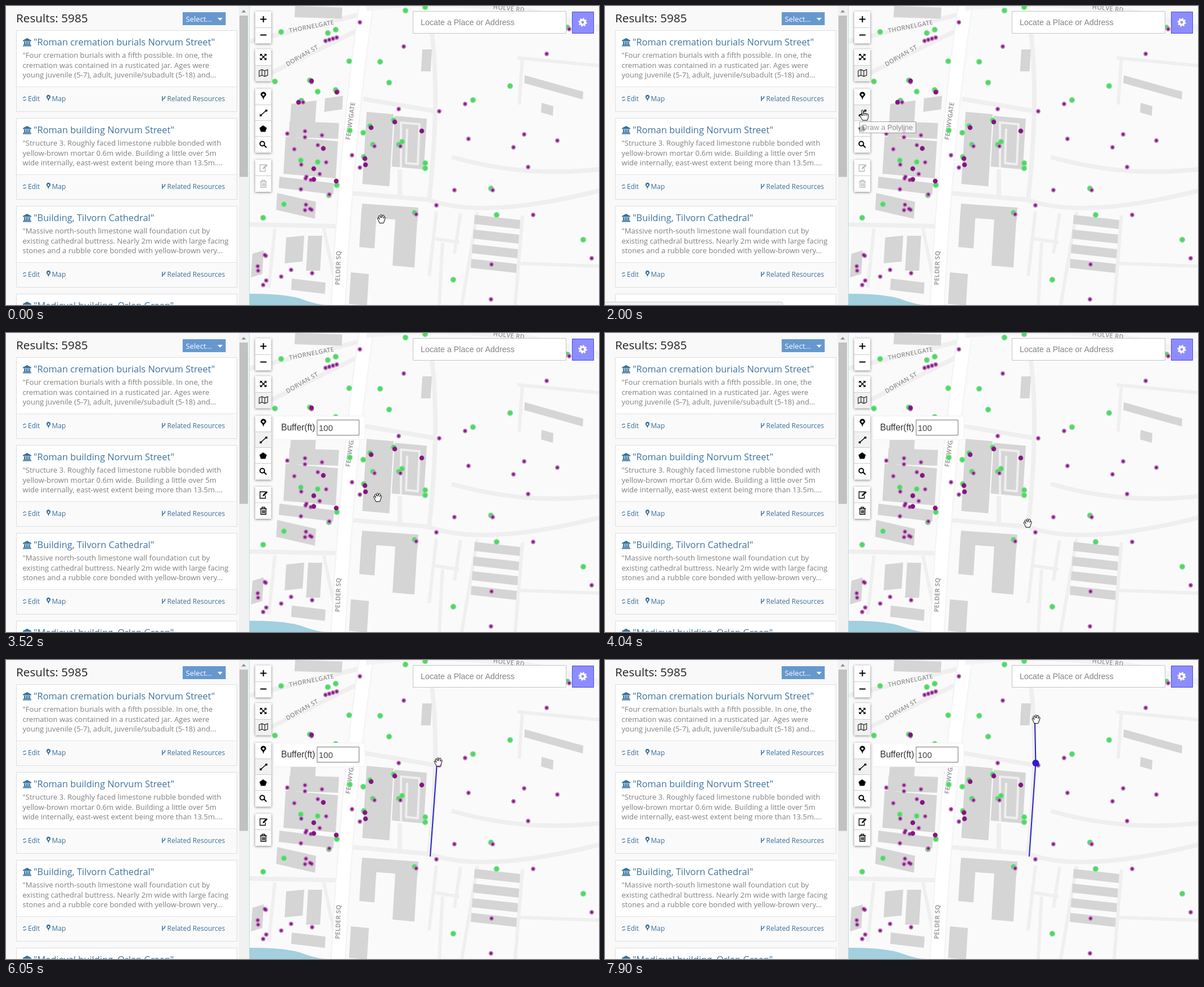
An HTML page that plays this animation: 1054 by 531 pixels, repeating every 8000 ms.

```html
<!DOCTYPE html>
<html lang="en">
<head>
<meta charset="utf-8">
<title>Map search</title>
<style>
html, body { margin: 0; width: 100%; height: 100%; overflow: hidden; background: #f9f9f9; }
svg { display: block; width: 100%; height: 100%; }
text { font-family: "Open Sans", sans-serif; white-space: pre; }
.arial { font-family: "Liberation Sans", Arial, sans-serif; }
.title { font-size: 16.4px; fill: #3d739f; }
.body { font-size: 13.1px; fill: #7f7f7f; }
.link { font-size: 12px; fill: #3a709f; }
.street { font-size: 11px; font-weight: 600; letter-spacing: .35px; fill: #8f8f8f; text-anchor: middle;
  stroke: #fafafa; stroke-width: 2.5px; paint-order: stroke; }
.road { fill: none; stroke-linejoin: round; }
.dots { fill: none; stroke-linecap: round; }
.box { fill: #fff; filter: drop-shadow(0 1px 2px rgba(0,0,0,.5)); }
.cursor { fill: #fff; stroke: #000; stroke-width: 1; stroke-linejoin: round; }
</style>
</head>
<body>
<svg id="stage" viewBox="0 0 1054 531" preserveAspectRatio="none">
  <defs>
    <path id="bank" fill="#35709c" d="M0 4 7.5 0 15 4v1.5H0zM2 6h2v5H2zM5 6h2v5H5zM8 6h2v5H8zM11 6h2v5h-2zM1 11h13v1.5H1zM0 13h15v1.400H0z"/>
    <path id="pin" d="M0 6C-1-1-5-1-5-3.500A5 5 0 0 1 5-3.500C5-1 1-1 0 6zM0-5.500a2 2 0 1 0 .01 0z" fill-rule="evenodd"/>
  </defs>

  <g id="map"></g>
  <path id="line" fill="none" stroke="#2a1fc8" stroke-width="2"/>
  <circle id="vertex" cx="765.5" cy="183" r="6" fill="#2a1fc8"/>

  <g id="controls">
    <path class="box" d="M443 9.500h28.500v57H443zM443 76.500h28.500v57H443zM443 147h28.500v113.500H443zM443 273h28.500v57H443z"/>
    <path d="M443 105h28.500v28.500H443z" fill="#f1f1f1"/>
    <path id="active" d="M443 175h28.500v28.500H443z" fill="#f1f1f1"/>
    <path d="M443 38.500h28.500m-28.500 67h28.500m-28.500 70h28.500m-28.500 28h28.500m-28.500 28h28.500m-28.500 70h28.500" stroke="#ccc"/>
    <path d="M452 23.500h11M457.500 18v11M452 51.500h11" stroke="#000" stroke-width="2"/>
    <path d="M453 86l9 9m0-9l-9 9M453 194l9-8" stroke="#000" stroke-width="1.5"/>
    <path d="M451.500 85h4.500l-4.500 4.500zm11.500 0v4.500l-4.500-4.500zm-11.500 11v-4.500l4.500 4.500zm11.500 0h-4.500l4.500-4.500z"/>
    <path d="M450 115l5-2 5 2 5-2v10l-5 2-5-2-5 2zm5-2v10m5-8v10" fill="none" stroke="#222" stroke-width="1.2"/>
    <use href="#pin" x="457.500" y="161"/>
    <path d="M451 192.500h3.500v3.500H451zm10-8.500h3.500v3.500H461zm-4 28l6.500 4.500-2.500 7h-8l-2.500-7z"/>
    <path d="M459 247.500l4 4M459.500 244.500a4 4 0 1 0-8 0 4 4 0 1 0 8 0" fill="none" stroke="#000" stroke-width="2"/>
    <g id="edit" fill="none" stroke="#000" stroke-width="1.3">
      <path d="M461 283v-1h-9.500v11.500H461v-5"/><path d="M456 290l1-3 6-6 2 2-6 6z" fill="#000" stroke="none"/>
      <path d="M451.500 312h12m-8.500-.5v-2h5v2m-7 1v9.500h9v-9.500m-6.300 2v5.500m2-5.500v5.500m2-5.500v5.500"/>
    </g>
  </g>

  <path d="M723.500 9.500h272v39h-272z" fill="#fff" stroke="#c4c4c4"/>
  <text class="arial" x="737" y="34" font-size="14.3" fill="#858585">Locate a Place or Address</text>
  <path d="M1006.500 10.500h38v38h-38z" fill="#8d8dff" stroke="#4b4bdc"/>
  <g fill="none" stroke="#fff">
    <circle cx="1025" cy="29" r="4.2" stroke-width="3.6"/>
    <circle cx="1025" cy="29" r="6.600" stroke-width="2.200" stroke-dasharray="2.600 2.584"/>
  </g>

  <g id="popover">
    <path d="M476 147.500h162v42H476z" fill="#fff" stroke="#f0f0f0"/>
    <text class="arial" x="489" y="173" font-size="15.6" fill="#333">Buffer(ft)</text>
    <path d="M553 154.500h74.500v27H553z" fill="#fff" stroke="#777"/>
    <text class="arial" x="556" y="174" font-size="15" fill="#444">100</text>
  </g>
  <g id="tip">
    <path d="M452.500 205.500h100v20h-100z" fill="#fff" stroke="#888"/>
    <text class="arial" x="457" y="220" font-size="13" fill="#777">Draw a Polyline</text>
  </g>

  <path d="M0 0h432v531H0z" fill="#f9f9f9"/>
  <path d="M414 0h17.500v531H414z" fill="#f1f1f1"/>
  <path d="M415 17h15v286.500h-15z" fill="#c1c1c1"/>
  <path d="M418.500 11.500h8l-4-4.500z" fill="#8a8a8a"/>
  <path d="M432.500 0v531" stroke="#b9d9e6"/>
  <text x="18" y="28.500" font-size="20.700" fill="#222">Results: 5985</text>
  <path d="M314 11h76.500v23H314z" fill="#6698cf"/>
  <text x="319.500" y="27.500" font-size="13.100" fill="#fff">Select...</text>
  <path d="M376 21h9l-4.500 5z" fill="#fff"/>
  <g id="cards"></g>

  <path id="status" d="M-1 525.500H312q4 0 4 4v3H-1z" fill="#f1f1f1" stroke="#cfcfcf"/>
  <path id="grab" class="cursor" d="M-7-1C-6-3-4-1-3 1L-5-4C-5-6-3-6-2-4L-1-2-2-6C-1-8 1-8 1-6V-2L2-6C3-7.500 5-7 5-5L4-1C5-4 8-4 7-1L5 5 4 7.500H-3L-4 5z"/>
  <path id="point" class="cursor" d="M-3-8c0-2 3-2 3 0v5c1-1 3-1 3 0 1-1 3-1 3 1 1-1 3 0 3 1v5l-2 5h-8l-5-8c0-2 2-2 4 0zM0-3v4M3-3v4M6-2v3"/>
</svg>
<script>
const $ = id => document.getElementById(id);
const range = n => [...Array(n).keys()];
const random = n => { const v = Math.sin(n * 12.9898) * 43758.5453; return v - Math.floor(v); };

const road = (width, d, color = '#efefef') =>
  `<path class="road" d="${d}" stroke-width="${width}" stroke="${color}"/>`;
// Blocks share the tilt of the street grid unless given their own slope.
const block = (x, y, w, h, slope = .09) =>
  `M${x} ${y}l${w} ${w * slope} ${-h * .06} ${h} ${-w} ${-w * slope}z`;
const street = (name, x, y, angle) =>
  `<text class="street" transform="translate(${x} ${y}) rotate(${angle})" y="4">${name}</text>`;
const points = list => list.split(' ').map(p => p.split(',').map(Number));
const dots = (list, outer, outerSize, inner, innerSize) => {
  const d = list.map(([x, y]) => `M${x} ${y}h.01`).join('');
  return `<g class="dots"><path d="${d}" stroke="${outer}" stroke-width="${outerSize}"/>` +
    `<path d="${d}" stroke="${inner}" stroke-width="${innerSize}"/></g>`;
};

const broadRoad = 'M641 -5Q606 230 590 540';
const roads = 'M433 63L625 16M445 132L627 42M635 165L765 187M756 40Q772 160 752 345' +
  'M612 332L750 344Q850 380 1054 328M792 268Q920 305 1054 290M700 290V338M433 388L592 391';
const lanes = 'M765 365L752 480M808 368L797 440M760 413L806 420M776 420L770 531M838 366L810 531' +
  'M918 372L905 531M912 457L1054 462M909 92L1054 106M918 90L912 175M478 395L467 500M565 395L585 492';

const blocks = [
  block(641, 188, 48, 128), block(691, 195, 57, 90),
  block(633, 351, 100, 24, .07), block(632, 360, 27, 68), block(693, 360, 39, 101),
  block(740, 77, 17, 39, 0), block(922, 123, 104, 14, .28), block(952, 172, 21, 17, .28),
  block(507, 174, 45, 45, -.14), block(504, 205, 88, 28, .03), block(497, 232, 93, 66),
  block(486, 303, 97, 20, .12), block(482, 332, 69, 30, .23), block(567, 164, 32, 24, -.14),
  block(438, 440, 20, 42, -.3), block(498, 411, 32, 46, -.1), block(537, 408, 25, 62, 0),
  block(508, 484, 60, 20, .12), block(613, 473, 32, 56), block(514, 0, 84, 20, .03),
  ...range(4).map(i => block(833 - i * 2, 371 + i * 26, 81, 16, .11))
].join('');

// Finds with a second, smaller find beside them
const paired = points('862,324 726,367 698,246 652,246 998,38 525,168 586,149 540,132');
const greens = [...paired, ...points('710,8 745,2 489,46 572,48 586,42 610,98 665,99 478,134 554,152 681,136 ' +
  '896,142 830,167 689,203 647,213 611,221 635,225 704,241 636,268 524,274 554,277 745,279 745,288 588,318 ' +
  '574,336 494,352 457,376 872,371 1026,415 795,486')];
const scatter = (n, seed, x, y, w, h) =>
  range(n).map(i => [x + w * random(seed + i * 2), y + h * random(seed + i * 2 + 1)]);
const sites = [
  ...paired.map(([x, y]) => [x + 3, y + 3]),
  ...range(4).map(i => [568 + i * 6.6, 62 - i * 2]),
  ...scatter(18, 5, 500, 200, 75, 165), ...scatter(9, 70, 434, 440, 150, 80),
  ...points('629,29 707,72 961,85 698,183 770,187 816,174 822,236 902,251 921,228 980,239 928,286 ' +
    '797,327 765,354 937,371 1041,448 863,459 862,521 615,265 629,287')
];
const strong = points('543,133 588,153 520,171 564,253 547,289 547,308 587,311 649,216 691,206 739,222 639,282 638,271');

$('map').innerHTML =
  '<path d="M432 0h622v531H432z" fill="#fafafa"/>' +
  '<path d="M432 511Q500 511 527 521T572 531H432z" fill="#a2d0df"/>' +
  road(8, roads) + road(6, lanes) +
  `<path d="${blocks}" fill="#d5d5d5"/>` +
  road(4, 'M702 287V207L735 210 732 281 711 279 713 218') +
  road(27, broadRoad, '#f3f3f3') + road(23, broadRoad, '#fff') +
  road(12, 'M640 3Q850 -22 1054 40', '#f3f3f3') +
  street('THORNELGATE', 543, 36, -11) + street('DORVAN ST', 526, 88, -30) + street('FENWYGATE', 612, 204, -82) +
  street('PELDER SQ', 590, 465, -88) + street('HOLVE RD', 894, 4, 5) +
  dots(greens, '#8ce49a', 10.5, '#50d765', 7.5) +
  dots(sites, '#c68ac5', 8.4, '#861c84', 4.8) +
  dots(strong, '#a04a9f', 8.8, '#84147f', 7.4);

const cards = [
  ['"Roman cremation burials Norvum Street"',
    '"Four cremation burials with a fifth possible. In one, the',
    'cremation was contained in a rusticated jar. Ages were',
    'young juvenile (5-7), adult, juvenile/subadult (5-18) and...'],
  ['"Roman building Norvum Street"',
    '"Structure 3. Roughly faced limestone rubble bonded with',
    'yellow-brown mortar 0.6m wide. Building a little over 5m',
    'wide internally, east-west extent being more than 13.5m....'],
  ['"Building, Tilvorn Cathedral"',
    '"Massive north-south limestone wall foundation cut by',
    'existing cathedral buttress. Nearly 2m wide with large facing',
    'stones and a rubble core bonded with yellow-brown very...'],
  ['"Medieval building, Orlan Green"']
];
$('cards').innerHTML = cards.map(([title, ...lines], i) => `<g transform="translate(0 ${i * 156})">
  <path d="M18.5 43.5h392v144h-392z" fill="#fff" stroke="#ddd"/>
  <path d="M19 144h391v43H19z" fill="#fafafa"/><path d="M19 143.5h391" stroke="#e4e4e4"/>
  <use href="#bank" x="30" y="57"/>
  <text class="title" x="49" y="70">${title}</text>
  ${lines.map((s, n) => `<text class="body" x="29.5" y="${92 + n * 17.5}">${s}</text>`).join('')}
  <path d="M30.5 164a2.7 2.7 0 0 1 4.7-1.500M35.500 165.500a2.700 2.700 0 0 1-4.700 1.500" fill="none" stroke="#3a709f" stroke-width="1.2"/>
  <text class="link" x="39" y="169">Edit</text>
  <use href="#pin" transform="translate(75.5 165) scale(.72 .85)" fill="#35709c"/>
  <text class="link" x="81.500" y="169">Map</text>
  <path d="M278 160v9m4.500-9v2q0 2-4.500 4" fill="none" stroke="#3a709f" stroke-width="1.5"/>
  <text class="link" x="286.5" y="169">Related Resources</text></g>`).join('');

// Cursor moves: start time, end time, destination
const moves = [
  [760, 1490, 459, 194], [3000, 3070, 462, 192], [3070, 4100, 752, 338], [4300, 4690, 756, 346],
  [4740, 5000, 774, 258], [5000, 5520, 768, 181], [6080, 6640, 768, 77], [6720, 7150, 767, 103], [7310, 7530, 766, 105]
];
function cursorAt(t) {
  let x = 667, y = 378;
  for (const [start, end, toX, toY] of moves) {
    const u = Math.min(1, Math.max(0, (t - start) / (end - start)));
    const eased = u * (2 - u);
    x += (toX - x) * eased;
    y += (toY - y) * eased;
  }
  return [x, y];
}

const show = (id, on) => $(id).style.display = on ? '' : 'none';

function draw(now) {
  const t = now % 8000, [x, y] = cursorAt(t);
  const overButton = x < 472, drawing = t >= 2150, placed = t >= 6080;
  for (const id of ['grab', 'point']) $(id).setAttribute('transform', `translate(${x} ${y})`);
  show('grab', !overButton);
  show('point', overButton);
  show('active', t >= 1490);
  show('status', t >= 1700 && t < 3140);
  show('tip', t >= 2000 && !drawing);
  $('tip').style.opacity = t < 2080 ? .75 : 1;
  show('popover', drawing);
  $('edit').style.opacity = drawing ? 1 : .28;
  show('line', t >= 4740);
  show('vertex', placed);
  $('line').setAttribute('d', `M754 349${placed ? 'L765.5 183' : ''}L${x - 2} ${y + 3}`);
  requestAnimationFrame(draw);
}
draw(0);
</script>
</body>
</html>
```
